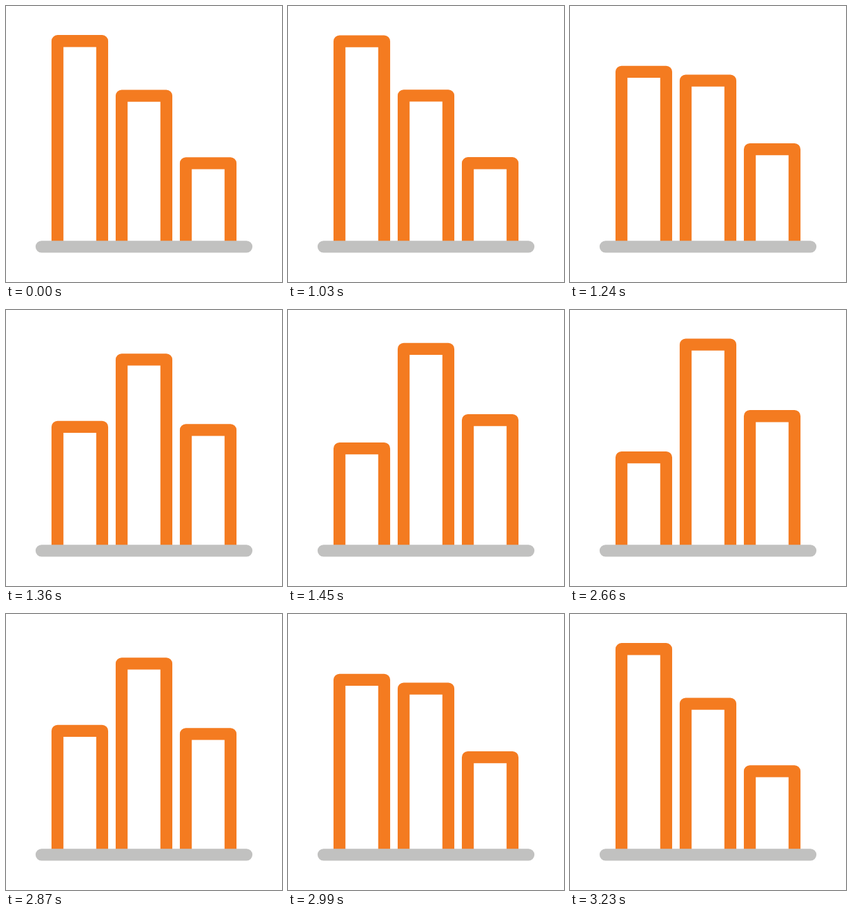
Recreate the animation shown at these times as an HTML page with a canvas. Size 400 px wide and 400 px high, loop 3.26 s.

```html
<!DOCTYPE html>
<html lang="en">
<head>
<meta charset="utf-8">
<title>Bar chart</title>
<style>
  html, body { margin: 0; width: 100%; height: 100%; overflow: hidden; background: #fff; }
  canvas { display: block; width: 400px; height: 400px; }
</style>
</head>
<body>
<canvas id="stage" width="400" height="400"></canvas>
<script>
const ctx = document.getElementById('stage').getContext('2d');

const HALF = 1630;   // one hold plus one move
const HOLD = 1000;
const TICK = 30;
const STEPS = 20;
const LINE = 17.3;
const BASE_Y = 348.8;

const bars = [
  { x: 74.6, from: 42.1, to: 205.3 },
  { x: 167.6, from: 121.4, to: 41.3 },
  { x: 260.6, from: 219.3, to: 144.9 }
];
const BAR_WIDTH = 64.8;

// cubic-bezier(0.6, 0, 0.4, 1), solved by bisection
function ease(u) {
  if (u <= 0) return 0;
  if (u >= 1) return 1;
  let lo = 0, hi = 1, s = u;
  for (let i = 0; i < 30; i++) {
    s = (lo + hi) / 2;
    const r = 1 - s;
    const x = 1.8 * s * r * r + 1.2 * s * s * r + s * s * s;
    if (x < u) lo = s; else hi = s;
  }
  return s * s * (3 - 2 * s);
}

function progress(time) {
  const t = time % (2 * HALF);
  const step = Math.floor((t % HALF - HOLD) / TICK);
  const p = ease(step / STEPS);
  return t < HALF ? p : 1 - p;
}

function drawBar(x, top) {
  const y = top + LINE / 2;
  ctx.beginPath();
  ctx.moveTo(x, BASE_Y);
  ctx.lineTo(x, y);
  ctx.lineTo(x + BAR_WIDTH, y);
  ctx.lineTo(x + BAR_WIDTH, BASE_Y);
  ctx.stroke();
}

function draw(time) {
  const p = progress(time);
  ctx.fillStyle = '#fff';
  ctx.fillRect(0, 0, 400, 400);

  ctx.lineWidth = LINE;
  ctx.lineJoin = 'round';
  ctx.lineCap = 'butt';
  ctx.strokeStyle = '#f47b20';
  for (const b of bars) drawBar(b.x, b.from + (b.to - b.from) * p);

  ctx.lineCap = 'round';
  ctx.strokeStyle = '#c1c1c0';
  ctx.beginPath();
  ctx.moveTo(51.5, BASE_Y);
  ctx.lineTo(348.5, BASE_Y);
  ctx.stroke();
}

const start = performance.now();
function loop() {
  draw(performance.now() - start);
  requestAnimationFrame(loop);
}
loop();
</script>
</body>
</html>
```
